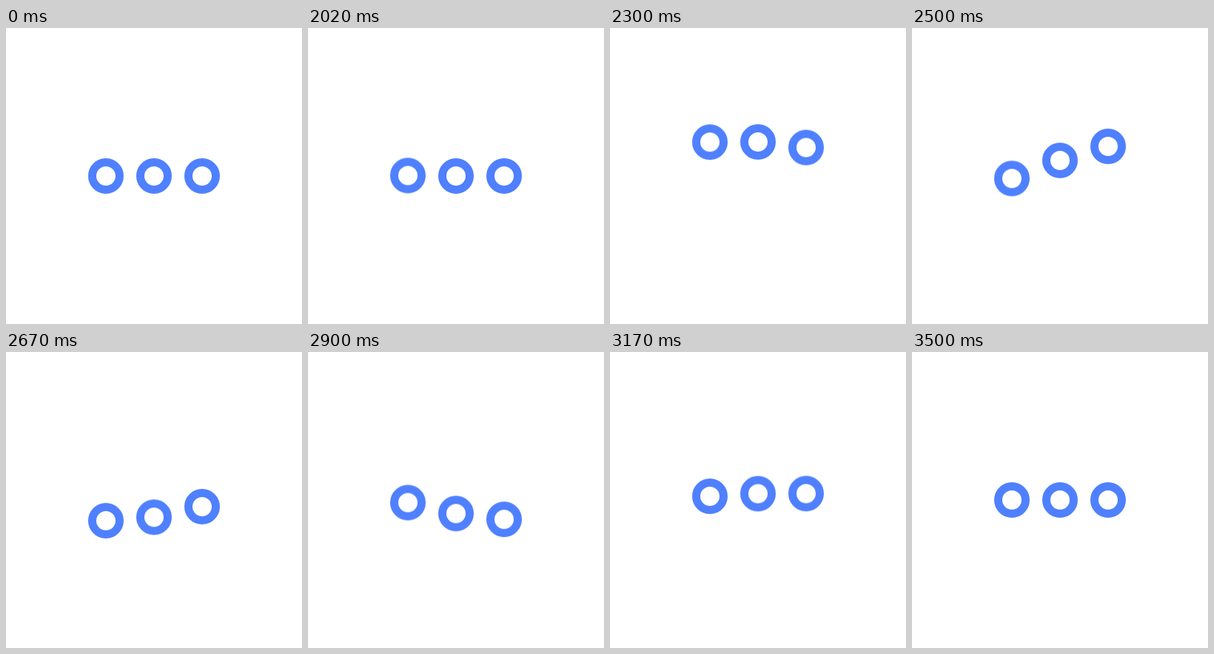
An HTML page without scripts that plays this animation: 400x400 px, repeating every 3.52 s.

```html
<!DOCTYPE html>
<html lang="en">
<head>
<meta charset="utf-8">
<title>Loading dots</title>
<style>
  html, body { margin: 0; width: 100%; height: 100%; overflow: hidden; background: #fff; }
  svg { display: block; width: 100%; height: 100%; }

  circle {
    fill: none;
    stroke: #4f80ff;
    stroke-width: 11px;
    animation: bounce 3520ms calc(var(--i) * 75ms) infinite;
  }

  /* Rest for 2 s, then a damped bounce: up, down, up, settle. */
  @keyframes bounce {
    0% { transform: translateY(0); animation-timing-function: linear; }
    56.818% { transform: translateY(0); animation-timing-function: cubic-bezier(.42, 0, .25, 1); }
    64.403% { transform: translateY(-46.8px); animation-timing-function: cubic-bezier(.42, 0, .5, 1); }
    76.136% { transform: translateY(28px); animation-timing-function: cubic-bezier(.55, 0, .5, 1); }
    86.648% { transform: translateY(-9px); animation-timing-function: cubic-bezier(.42, 0, .4, 1); }
    95.17%, 100% { transform: translateY(0); }
  }
</style>
</head>
<body>
<svg viewBox="0 0 400 400">
  <circle cx="135" cy="200" r="18.5" style="--i: 0"/>
  <circle cx="200" cy="200" r="18.5" style="--i: 1"/>
  <circle cx="265" cy="200" r="18.5" style="--i: 2"/>
</svg>
</body>
</html>
```
